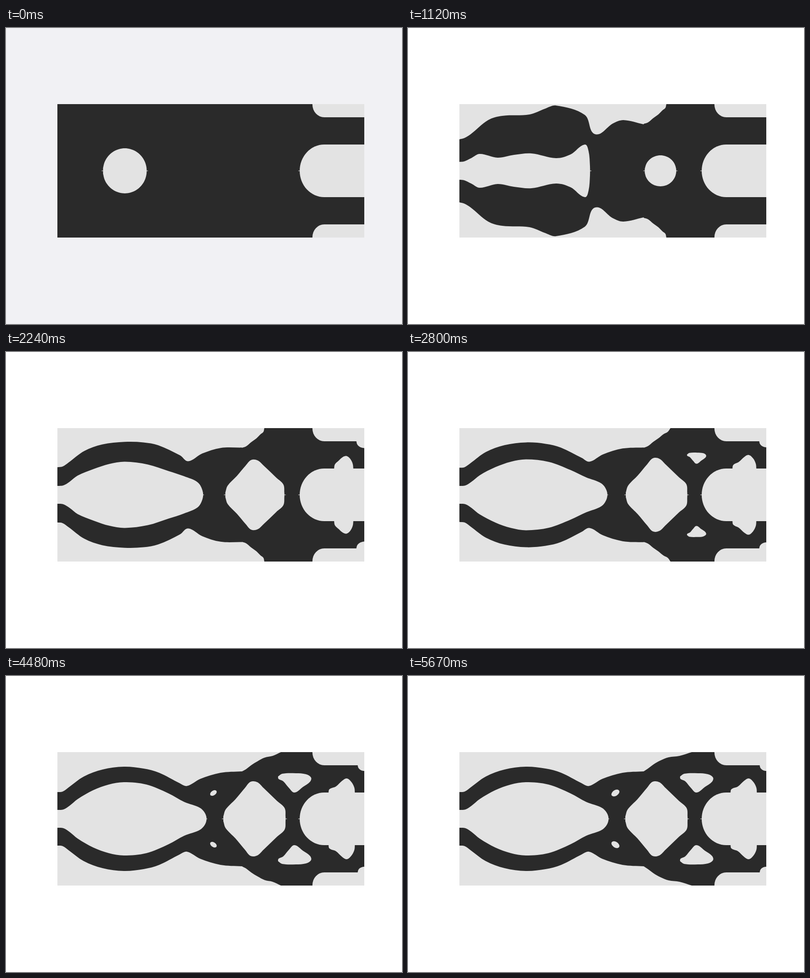
These frames come from a looping animation (840 px wide and 630 px high, 5740 ms). An HTML page with a canvas:

```html
<!DOCTYPE html>
<html lang="en">
<head>
<meta charset="utf-8">
<title>Topology optimisation</title>
<style>
html, body { margin: 0; width: 100%; height: 100%; overflow: hidden; }
canvas { display: block; }
</style>
</head>
<body>
<canvas id="stage" width="840" height="630"></canvas>
<script>
const STEP = 70, STEPS = 82, LAST = STEPS - 1;
const LEFT = 109, TOP = 162, RIGHT = 760, BOTTOM = 446, AXIS = 304;
const SOLID = '#2a2a2a', VOID = '#e3e3e3';
const ctx = document.getElementById('stage').getContext('2d');

const clamp = v => Math.min(1, Math.max(0, v));
const mix = (a, b, k) => a.map((v, i) => v + (b[i] - v) * k);
const mirror = ([x, y]) => [x, 2 * AXIS - y];
const pts = (...v) => v.filter((_, i) => i % 2 === 0).map((x, i) => [x, v[2 * i + 1]]);
const flat = points => points.map(([x]) => [x, TOP - 2]);

// Points on an elliptic arc; angles are in half turns.
function arc(cx, cy, rx, ry, from, to, count, tilt = 0) {
  return Array.from({ length: count }, (_, i) => {
    const a = Math.PI * (from + (to - from) * i / (count - 1));
    const x = rx * Math.cos(a), y = -ry * Math.sin(a);
    const c = Math.cos(tilt), s = Math.sin(tilt);
    return [cx + x * c - y * s, cy + x * s + y * c];
  });
}

// Upper halves of the holes: seed grows into start, which settles into end.
const lens = {
  born: 0, full: 16, growth: 2, settling: 6,
  seed: arc(252, AXIS, 46.5, 48, 0.96, 0.04, 12),
  start: pts(109,285, 119,284, 134,277, 152,268, 190,276, 225,270, 262,267, 314,277, 345,269, 375,248, 383,262, 386,294),
  end: pts(109,285, 122,284, 135,276, 152,262, 185,243, 218,231, 250,226, 298,231, 345,250, 378,268, 412,281, 424,296)
};
const diamond = {
  born: 8, full: 16, growth: 1, settling: 8,
  seed: [[533, AXIS]],
  start: arc(535.5, AXIS, 33.5, 33, 0.96, 0.04, 10),
  end: pts(461,299, 466,284, 487,262, 507,238, 519,225, 533,226, 546,238, 575,266, 591,281, 593,300)
};

// Shapes that appear twice, above and below the axis.
const waistStart = pts(109,237, 120,234, 133,226, 170,196, 200,187, 258,184, 290,172, 314,165, 375,185, 397,226, 435,203, 457,196, 500,205);
const waist = {
  born: 9, full: 16, growth: 1, settling: 6, open: true,
  seed: flat(waistStart),
  start: waistStart,
  end: pts(109,247, 120,246, 133,237, 165,214, 205,199, 250,193, 292,197, 325,206, 368,228, 384,234, 412,219, 455,206, 500,203)
};
const shoulderStart = pts(500,204, 509,201, 520,192, 531,184, 540,175, 546,170, 548,162);
const shoulder = {
  born: 9, full: 16, growth: 1, settleFrom: 32, settling: 1, open: true,
  seed: flat(shoulderStart),
  start: shoulderStart,
  end: pts(500,203, 509,197, 521,188, 535,180, 553,173, 576,170, 602,162)
};
const bump = {
  born: 16, full: 28, growth: 0.5, settling: 6,
  seed: [[719, 250]],
  start: arc(719, 250, 16, 27, 0, 1, 8),
  end: pts(740,249, 739,238, 733,226, 723,218, 713,223, 700,235, 686,241, 684,249)
};
const jawStep = {
  born: 16, full: 24, growth: 1, settling: 6,
  seed: [[RIGHT, 190]],
  start: arc(RIGHT, 190, 21, 18, -1, 0, 8),
  end: arc(RIGHT, 190, 14, 12, -1, 0, 8)
};
const triangle = {
  born: 34, full: 52, growth: 0.5,
  seed: [[612, 224]],
  start: pts(577,214, 586,208, 615,207, 636,209, 647,216, 645,225, 630,236, 612,248, 600,238, 588,224, 578,219, 577,214)
};
const pinhole = {
  born: 46, full: LAST, growth: 0.3,
  seed: [[440, 249]],
  start: arc(440, 249, 9.5, 6, 0, 2, 13, -0.6)
};
const paired = [waist, shoulder, bump, jawStep, triangle, pinhole];

function pose({ born, full, growth, settleFrom = full, settling, seed, start, end = start }, step) {
  const grown = clamp((step - born) / (full - born)) ** growth;
  const settled = end === start ? 0 : 1 - (1 - clamp((step - settleFrom) / (LAST - settleFrom))) ** settling;
  return start.map((p, i) => mix(mix(seed[i % seed.length], p, grown), end[i], settled));
}

// Smooth curve whose handles follow the neighbours, scaled to each chord.
function fillCurve(points, edge) {
  const tangents = points.map((p, i) => {
    const a = points[i - 1] ?? p, b = points[i + 1] ?? p;
    const dx = b[0] - a[0], dy = b[1] - a[1], len = Math.hypot(dx, dy) || 1;
    return [dx / len, dy / len];
  });
  ctx.beginPath();
  ctx.moveTo(...points[0]);
  for (let i = 1; i < points.length; i++) {
    const [px, py] = points[i - 1], [x, y] = points[i];
    const [ux, uy] = tangents[i - 1], [vx, vy] = tangents[i];
    const h = Math.hypot(x - px, y - py) / 3;
    ctx.bezierCurveTo(px + ux * h, py + uy * h, x - vx * h, y - vy * h, x, y);
  }
  if (edge) {
    ctx.lineTo(points.at(-1)[0], edge);
    ctx.lineTo(points[0][0], edge);
  }
  ctx.fill();
}

function fillRounded(x, y, height, rx, ry) {
  ctx.beginPath();
  ctx.roundRect(x, y, 300, height, { x: rx, y: ry });
  ctx.fill();
}

const drawTick = x => ctx.fillRect(x - 3, AXIS - 0.5, 6, 1);

function drawCentred(shape, step) {
  if (step <= shape.born && shape.seed.length === 1) return;
  const half = pose(shape, step);
  fillCurve([...half, ...half.map(mirror).reverse()]);
  drawTick(half[0][0]);
  drawTick(half.at(-1)[0]);
}

function drawPaired(shape, step) {
  if (step <= shape.born) return;
  const points = pose(shape, step);
  fillCurve(points, shape.open && TOP);
  fillCurve(points.map(mirror), shape.open && BOTTOM);
}

function drawJaw() {
  fillRounded(623, 248, 112, 52, 56);
  fillRounded(650, 90, 100, 25, 27);
  fillRounded(650, 418, 100, 25, 27);
  drawTick(623);
}

function draw(step) {
  ctx.fillStyle = step ? '#fff' : '#f1f1f4';
  ctx.fillRect(0, 0, 840, 630);
  ctx.save();
  ctx.beginPath();
  ctx.rect(LEFT, TOP, RIGHT - LEFT, BOTTOM - TOP);
  ctx.clip();
  ctx.fillStyle = SOLID;
  ctx.fillRect(LEFT, TOP, RIGHT - LEFT, BOTTOM - TOP);
  ctx.fillStyle = VOID;
  drawJaw();
  drawCentred(lens, step);
  drawCentred(diamond, step);
  paired.forEach(shape => drawPaired(shape, step));
  ctx.restore();
}

function tick() {
  draw(Math.floor(performance.now() / STEP) % STEPS);
  requestAnimationFrame(tick);
}
tick();
</script>
</body>
</html>
```
